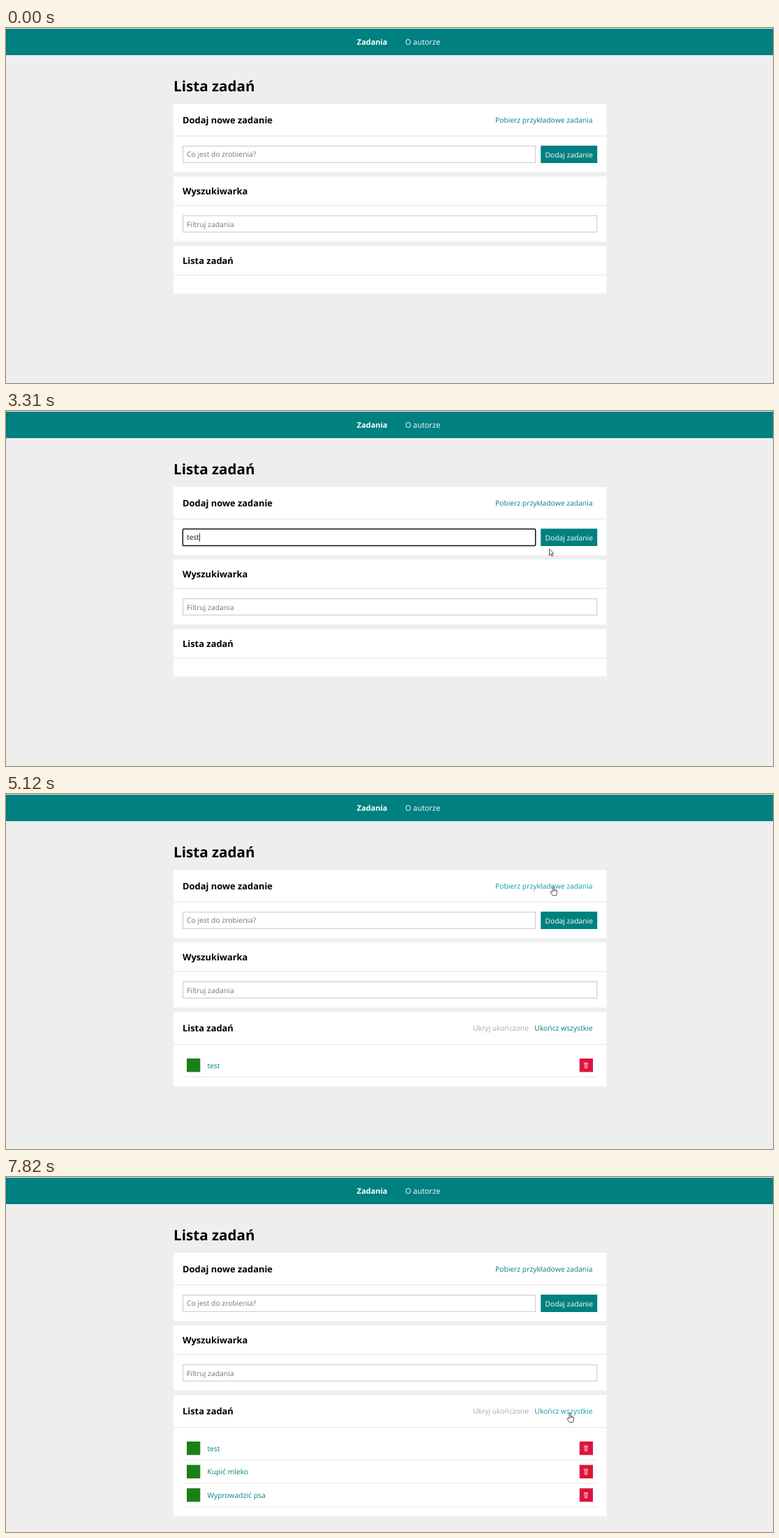
An HTML page with a canvas for the animation above (8 s loop, 1099x510 px).

```html
<!DOCTYPE html>
<html lang="pl">
<head>
<meta charset="utf-8">
<title>Lista zadań</title>
<style>
html, body { margin: 0; width: 100%; height: 100%; overflow: hidden; background: #eee; }
canvas { display: block; }
</style>
</head>
<body>
<canvas id="stage" width="1099" height="510"></canvas>
<script>
const ctx = document.getElementById('stage').getContext('2d');
const LOOP = 8000;
const TEAL = '#008080', PAGE = '#eee', HINT = '#757575', OFF = '#a9a9a9', HOVER = '#149a9a';
const BODY = 10.34, HEAD = 12.9;

// Each step overrides the state before it; cursor is [kind, x, y].
const steps = [
  { at: 0, cursor: null, typed: '', focus: false, button: false, tasks: 0, link: 'idle', all: false },
  { at: 280, cursor: ['arrow', 962, 283] },
  { at: 580, cursor: ['arrow', 640, 222] },
  { at: 900, cursor: ['beam', 429.5, 189], focus: true },
  { at: 1200, cursor: null, typed: 't' },
  { at: 1500, typed: 'te' },
  { at: 1800, typed: 'tes' },
  { at: 2100, typed: 'test' },
  { at: 2720, cursor: ['beam', 480, 189] },
  { at: 3010, cursor: ['arrow', 690, 199] },
  { at: 3310, cursor: ['arrow', 778.5, 198] },
  { at: 3610, cursor: ['hand', 795, 188.5], button: true },
  { at: 3910, typed: '', focus: false, tasks: 1 },
  { at: 4210, cursor: ['arrow', 853, 272], button: false },
  { at: 4520, cursor: ['arrow', 893, 341] },
  { at: 4820, cursor: ['arrow', 838, 216] },
  { at: 5120, cursor: ['hand', 784, 132.5], link: 'hover' },
  { at: 5410, cursor: ['hand', 785, 134] },
  { at: 5710, cursor: ['arrow', 788, 147], link: 'loading' },
  { at: 6020, cursor: ['arrow', 836, 226] },
  { at: 6320, cursor: ['arrow', 884, 314] },
  { at: 6630, cursor: ['arrow', 893, 331] },
  { at: 6930, cursor: ['arrow', 889, 336] },
  { at: 7230, cursor: ['arrow', 862, 341], link: 'idle', tasks: 3 },
  { at: 7520, cursor: ['hand', 826, 340], all: true },
  { at: 7820, cursor: ['hand', 808, 339] }
];
const names = ['test', 'Kupić mleko', 'Wyprowadzić psa'];

function box(x, y, r, b, color) {
  ctx.fillStyle = color;
  ctx.fillRect(x, y, r - x, b - y);
}

// y is the middle of the text line
function text(str, x, y, { size = BODY, color = '#000', bold = false, align = 'left' } = {}) {
  ctx.font = `${bold ? 700 : 400} ${size}px "Open Sans", sans-serif`;
  ctx.textAlign = align;
  ctx.fillStyle = color;
  ctx.fillText(str, x, y + size * 0.388);
}

function field(x, y, r, b) {
  ctx.strokeStyle = '#d3d3d3';
  ctx.lineWidth = 1.3;
  ctx.strokeRect(x + 0.65, y + 0.65, r - x - 1.3, b - y - 1.3);
}

function panel(title, top, line, bottom) {
  box(240, top, 860.5, bottom, '#fff');
  box(240, line, 860.5, line + 1.3, '#e9e9e9');
  text(title, 253, (top + line) / 2, { size: HEAD, bold: true });
}

function path(points, close) {
  ctx.beginPath();
  points.forEach(([x, y]) => ctx.lineTo(x, y));
  if (close) ctx.closePath();
}

function trash(x, y) {
  ctx.save();
  ctx.translate(x, y);
  ctx.strokeStyle = 'rgba(255,235,238,0.85)';
  ctx.lineWidth = 0.8;
  ctx.strokeRect(-2.4, -3.8, 4.8, 1.3);
  path([[-2.1, -2.2], [-1.7, 3.8], [1.7, 3.8], [2.1, -2.2]]);
  ctx.stroke();
  ctx.lineWidth = 0.6;
  for (const dx of [-0.7, 0.7]) {
    path([[dx, -2], [dx, 3.6]]);
    ctx.stroke();
  }
  ctx.restore();
}

function task(i) {
  const y = 389.7 + i * 33.6;
  box(259, y - 9.7, 278.3, y + 9.7, '#1a7f1a');
  text(names[i], 288.4, y, { color: TEAL });
  box(821.8, y - 9.7, 841, y + 9.7, '#dc143c');
  trash(831, y + 0.3);
  box(253, y + 16.3, 847.5, y + 17.3, '#e8e8e8');
}

const cursors = {
  arrow() {
    path([[0, 0], [0, 9.3], [2.1, 7.4], [3.6, 10.8], [5.1, 10.1], [3.6, 6.9], [6.4, 6.7]], true);
    ctx.fill();
    ctx.stroke();
  },
  beam() {
    ctx.strokeStyle = '#555';
    path([[0, -4.5], [0, 4.5]]);
    ctx.stroke();
    for (const y of [-4.7, 4.7]) {
      path([[-2, y], [2, y]]);
      ctx.stroke();
    }
  },
  hand() {
    ctx.beginPath();
    ctx.moveTo(-1, 8);
    ctx.lineTo(-1, 1);
    ctx.quadraticCurveTo(0.1, -0.7, 1.1, 1);
    ctx.lineTo(1.1, 4.6);
    ctx.quadraticCurveTo(2.6, 4.1, 3, 5.2);
    ctx.quadraticCurveTo(4.2, 4.9, 4.4, 6);
    ctx.quadraticCurveTo(5.6, 5.7, 5.6, 7);
    ctx.lineTo(5.4, 10);
    ctx.lineTo(4.3, 13.3);
    ctx.lineTo(-0.8, 13.3);
    ctx.lineTo(-4, 8.4);
    ctx.quadraticCurveTo(-3.3, 6.5, -1, 8);
    ctx.fill();
    ctx.stroke();
    for (const x of [1.1, 3]) {
      path([[x, 5], [x, 7.2]]);
      ctx.stroke();
    }
  }
};

function pointer([kind, x, y]) {
  ctx.save();
  ctx.translate(x, y);
  ctx.fillStyle = '#fff';
  ctx.strokeStyle = '#222';
  ctx.lineWidth = 0.8;
  ctx.lineJoin = 'round';
  cursors[kind]();
  ctx.restore();
}

function taskInput(s) {
  if (s.focus) {
    ctx.strokeStyle = '#101010';
    ctx.lineWidth = 1.5;
    ctx.beginPath();
    ctx.roundRect(253.3, 169.4, 505.4, 24.2, 1.5);
    ctx.stroke();
  } else {
    field(253, 169, 759.3, 194);
  }
  const hint = s.typed === '';
  text(s.typed || 'Co jest do zrobienia?', 259, 181.4, { color: hint ? HINT : '#111' });
  if (s.focus) {
    const end = 259.2 + (hint ? 0 : ctx.measureText(s.typed).width);
    box(end, 175.5, end + 0.8, 187.5, '#000');
  }
}

function addButton(hover) {
  ctx.save();
  ctx.translate(806.7, 181.5);
  if (hover) ctx.scale(1.02, 1.02);
  box(-40.5, -12.5, 40.5, 12.5, hover ? '#00a0a0' : TEAL);
  text('Dodaj zadanie', 0, 0, { color: '#fff', align: 'center' });
  ctx.restore();
}

function draw(s) {
  box(0, 0, 1099, 510, PAGE);
  box(0, 1, 1099, 39, TEAL);
  text('Zadania', 502.8, 20, { size: 10.95, color: '#fff', bold: true });
  text('O autorze', 572, 20, { size: 10.95, color: '#fff' });
  text('Lista zadań', 240, 83, { size: 20.65, bold: true });

  panel('Dodaj nowe zadanie', 109, 154.5, 207);
  const busy = s.link === 'loading';
  text(busy ? 'Ładowanie...' : 'Pobierz przykładowe zadania', 840.5, 131.7, {
    align: 'right',
    color: busy ? OFF : s.link === 'hover' ? HOVER : TEAL
  });
  taskInput(s);
  addButton(s.button);

  panel('Wyszukiwarka', 213.3, 254.3, 306.8);
  field(253, 269, 847.3, 293.8);
  text('Filtruj zadania', 259, 281.5, { color: HINT });

  if (s.tasks) {
    panel('Lista zadań', 313.2, 359.2, 386.6 + s.tasks * 33.6);
    text('Ukryj ukończone', 749, 336, { color: OFF, align: 'right' });
    text('Ukończ wszystkie', 840.5, 336, { color: s.all ? HOVER : TEAL, align: 'right' });
    for (let i = 0; i < s.tasks; i++) task(i);
  } else {
    panel('Lista zadań', 313.2, 354.3, 381.4);
  }
  if (s.cursor) pointer(s.cursor);
}

function frame() {
  const t = performance.now() % LOOP;
  draw(Object.assign({}, ...steps.filter(step => step.at <= t)));
  requestAnimationFrame(frame);
}

ctx.textRendering = 'geometricPrecision';
frame();
</script>
</body>
</html>
```
